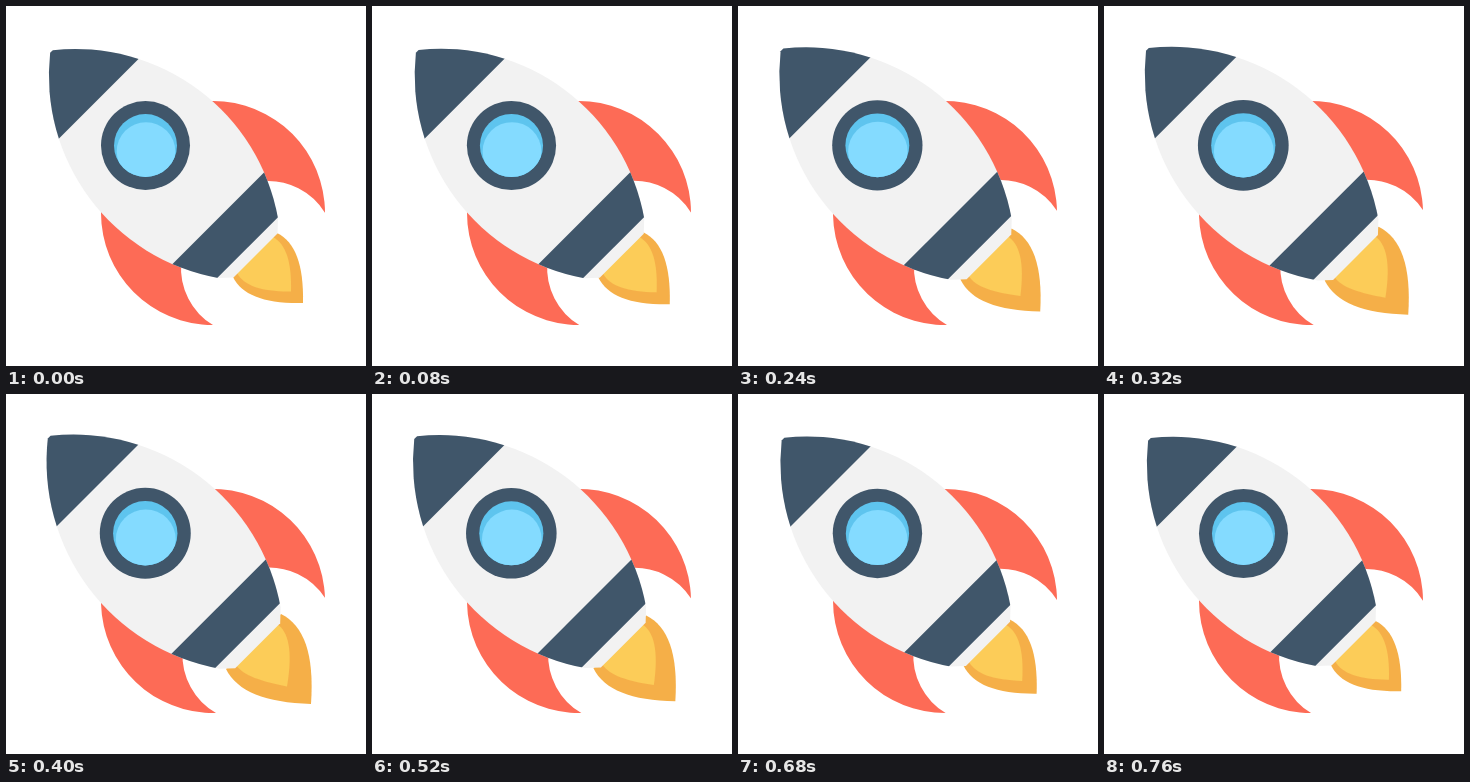
Recreate the animation shown at these times as an HTML page with a canvas. Size 360 by 360 pixels, loop 0.8 s.

```html
<!DOCTYPE html>
<html lang="en">
<head>
<meta charset="utf-8">
<title>Rocket</title>
<style>
  html, body { margin: 0; width: 100%; height: 100%; overflow: hidden; background: #fff; }
  canvas { display: block; width: 360px; height: 360px; }
</style>
</head>
<body>
<canvas id="stage" width="360" height="360"></canvas>
<script>
const ctx = document.getElementById('stage').getContext('2d');
const LOOP = 800, STEP = 40;
const NAVY = '#40566a', WHITE = '#f2f2f2', RED = '#fd6b56';
const ORANGE = '#f5af48', YELLOW = '#fccc58', SKY = '#5ec4ee', PALE = '#84dbff';

const lerp = (a, b, p) => a + (b - a) * p;
const mix = ([x0, y0], [x1, y1], p) => [lerp(x0, x1, p), lerp(y0, y1, p)];

function fill(color) {
  ctx.fillStyle = color;
  ctx.fill();
}

function disc(x, y, r, color) {
  ctx.beginPath();
  ctx.arc(x, y, r, 0, Math.PI * 2);
  fill(color);
}

// Stripe across the rocket's axis, between the lines x + y = from and x + y = to.
function stripe(from, to) {
  ctx.beginPath();
  ctx.moveTo(from, 0);
  ctx.lineTo(to, 0);
  ctx.lineTo(0, to);
  ctx.lineTo(0, from);
  fill(NAVY);
}

// Crescent between two circles that meet at the tip.
function fin() {
  ctx.beginPath();
  ctx.arc(207, 207, 112, -1.67, 0);
  ctx.arc(262, 242, 67, -0.55, -1.65, true);
  fill(RED);
}

function drawFins(p) {
  ctx.save();
  ctx.translate(207, 207);
  ctx.rotate(-0.027 * p);
  ctx.translate(-207, -207);
  fin();
  ctx.transform(0, 1, 1, 0, 0, 0); // swap x and y for the other side
  fin();
  ctx.restore();
}

// Flame from a neck and its mirror image to a shared tip.
function leaf([x, y], tip, color) {
  const reach = (tip[0] + tip[1]) / 2;
  const c1 = [lerp(x, reach, 0.7), lerp(y, reach, 0.13)];
  const c2 = [lerp(x, reach, 1.03), lerp(y, reach, 0.45)];
  ctx.beginPath();
  ctx.moveTo(x, y);
  ctx.bezierCurveTo(...c1, ...c2, ...tip);
  ctx.bezierCurveTo(c2[1], c2[0], c1[1], c1[0], y, x);
  fill(color);
}

function drawFlame(p) {
  leaf(mix([271, 227], [275, 220], p), mix([297, 297], [305, 310], p), ORANGE);
  leaf(mix([267, 231], [271, 230], p), mix([285, 285.5], [281, 292.5], p), YELLOW);
}

// The hull is the overlap of two circles, cut off at the tail.
function hull() {
  const near = 69.3, far = 248.9, nose = 1.68, shoulder = 0.18;
  ctx.beginPath();
  ctx.arc(near, far, 206, -nose, -shoulder);
  ctx.lineTo(271.5, 227.5);
  ctx.lineTo(227.5, 271.5);
  ctx.arc(far, near, 206, Math.PI / 2 + shoulder, Math.PI / 2 + nose);
  ctx.closePath();
}

function drawPorthole() {
  const c = 139.5;
  disc(c, c, 44.5, NAVY);
  disc(c, c, 31.5, SKY);
  ctx.clip();
  disc(c + 0.5, c + 6, 29.3, PALE);
}

function drawBody(p) {
  const size = 1 + 0.022 * p;
  ctx.save();
  ctx.translate(150, 150);
  ctx.scale(size, size);
  ctx.translate(-150, -150);
  ctx.save();
  hull();
  fill(WHITE);
  ctx.clip();
  stripe(0, 185.5);
  ctx.setTransform(1, 0, 0, 1, 0, 0);
  stripe(lerp(424.5, 425.2, p), 483.2);
  ctx.restore();
  drawPorthole();
  ctx.restore();
}

function draw(time) {
  const t = Math.floor((time % LOOP) / STEP) * STEP;
  const p = (1 - Math.cos(2 * Math.PI * t / LOOP)) / 2;
  ctx.fillStyle = '#fff';
  ctx.fillRect(0, 0, 360, 360);
  drawFins(p);
  drawFlame(p);
  drawBody(p);
}

const start = performance.now();
function tick() {
  draw(performance.now() - start);
  requestAnimationFrame(tick);
}
tick();
</script>
</body>
</html>
```
